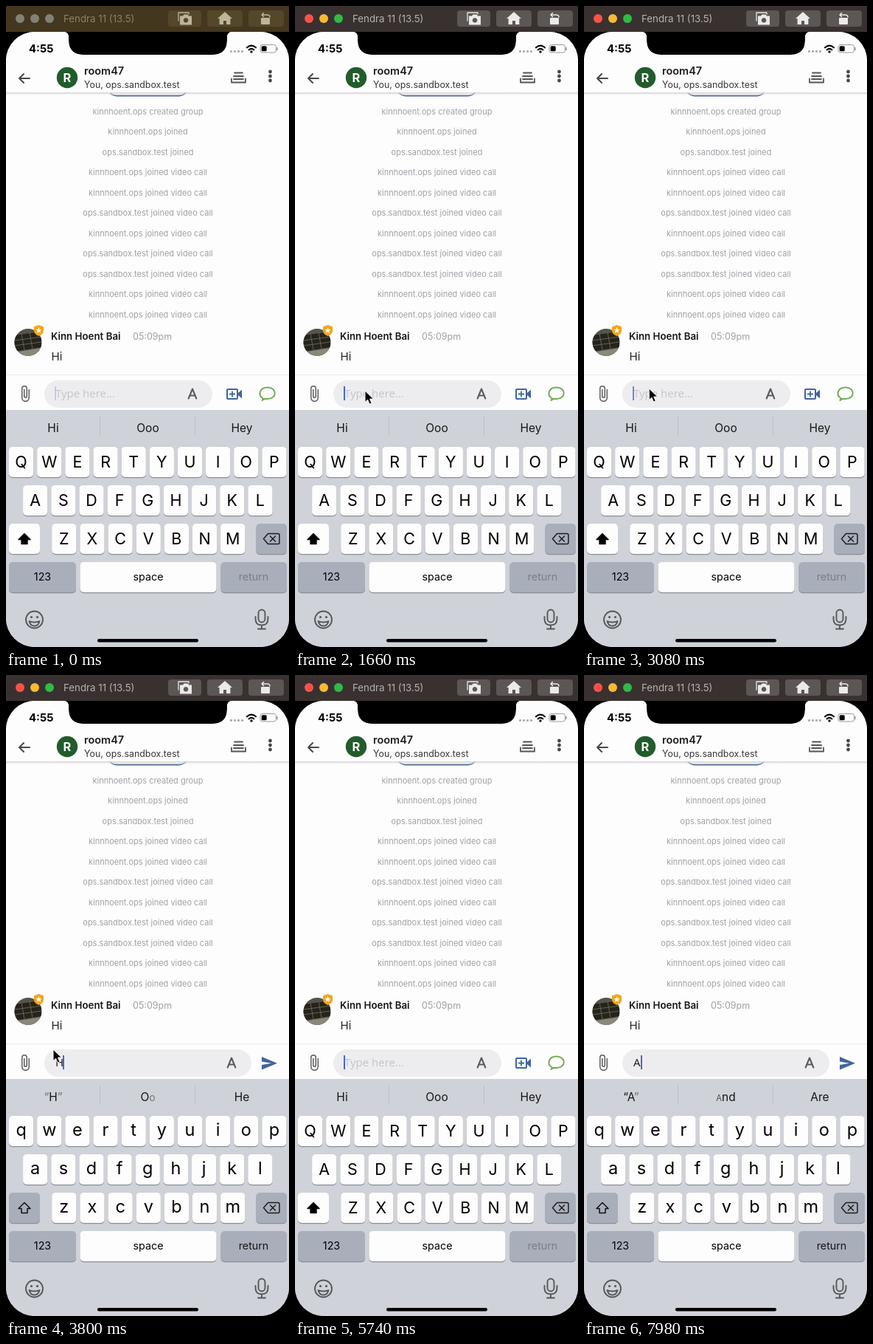
An HTML page for the animation above (8000 ms loop, 384 by 868 pixels).

```html
<!DOCTYPE html>
<html lang="en">
<head>
<meta charset="utf-8">
<title>Chat</title>
<style>
html, body { margin: 0; width: 100%; height: 100%; overflow: hidden; background: #000; }
svg { display: block; width: 100%; height: 100%; }
text { font-family: Inter, Roboto, sans-serif; white-space: pre; }
.open { font-family: "Open Sans", "Noto Sans", sans-serif; }
.mid { text-anchor: middle; }
.line { fill: none; stroke-linecap: round; stroke-linejoin: round; }
</style>
</head>
<body>
<svg id="stage" viewBox="0 0 384 868">
  <defs>
    <clipPath id="screen">
      <path d="M0 74A39 39 0 0 1 39 35H78Q85 35 85 43V46Q85 66 105 66H280Q300 66 300 46V43Q300 35 307 35H345A39 39 0 0 1 384 74V829A39 39 0 0 1 345 868H39A39 39 0 0 1 0 829Z"/>
    </clipPath>
    <clipPath id="face"><circle cx="30" cy="455.500" r="18.500"/></clipPath>
    <linearGradient id="shade" x2="0" y2="1">
      <stop stop-color="#cfcfd2"/><stop offset="1" stop-color="#fdfdfd" stop-opacity="0"/>
    </linearGradient>
  </defs>
  <rect width="384" height="868"/>

  <rect id="bar" width="384" height="35"/>
  <g id="lights"></g>
  <text id="device" x="78" y="22" font-size="13.3">Fendra 11 (13.5)</text>
  <g id="tools">
    <rect x="220" y="6" width="45" height="22" rx="4"/>
    <rect x="273" y="6" width="48" height="22" rx="4"/>
    <rect x="329" y="6" width="48" height="22" rx="4"/>
  </g>
  <g id="toolIcons">
    <path class="line" stroke="currentColor" stroke-width="1.300" d="M234 20V9H248V11"/>
    <path fill="currentColor" fill-rule="evenodd" d="M236 13.500h4l1.500-2h5l1.500 2h4v12h-16zM244 16a3.300 3.300 0 1 0 .1 0z"/>
    <path fill="currentColor" d="M297 8l10 9h-2.600v8H299v-5h-4v5h-5.400v-8H287z"/>
    <rect x="346" y="16" width="12" height="9" rx="1" fill="currentColor"/>
    <path class="line" stroke="currentColor" stroke-width="1.500" d="M347 12h7q4 0 4 3M349.500 9.500L347 12l2.500 2.500"/>
  </g>

  <g clip-path="url(#screen)">
    <rect y="35" width="384" height="833" fill="#fdfdfd"/>
    <rect x="138" y="90" width="109" height="31.500" rx="12" fill="none" stroke="#4c6590" stroke-width="1.800"/>
    <rect y="35" width="384" height="82" fill="#fdfdfd"/>
    <rect y="117" width="384" height="5" fill="url(#shade)"/>

    <text x="31" y="63" font-size="14.800" font-weight="650">4:55</text>
    <path d="M304 61.500H322" stroke="#a9a9ac" stroke-width="2.500" stroke-dasharray="3 2"/>
    <g class="line" stroke="#000" stroke-width="2.200">
      <path d="M327 56.300Q333 51 339 56.300M329.700 59.300Q333 56.300 336.300 59.300"/>
    </g>
    <circle cx="333" cy="62" r="1.700"/>
    <rect x="345" y="52.500" width="21.500" height="10.500" rx="3" fill="none" stroke="#98989b"/>
    <rect x="346.700" y="54.200" width="7" height="7.100" rx="1.500"/>
    <path d="M368 56v4" stroke="#98989b" stroke-width="1.500"/>

    <path class="line" d="M32 98H18M24 92l-6 6 6 6" stroke="#48484c" stroke-width="2"/>
    <circle cx="83" cy="97" r="14.200" fill="#235c2c"/>
    <text class="mid" x="83" y="103" font-size="16.500" font-weight="700" fill="#fdfdfd">R</text>
    <text x="106" y="93" font-size="14.500" font-weight="600" fill="#1c1c1e">room47</text>
    <text x="106" y="110.500" font-size="12.400" fill="#38383c">You, ops.sandbox.test</text>
    <path class="line" d="M310 90.500H321M309 95H322M306 98.500V103.500H325V98.500M309 99H322" stroke="#555559" stroke-width="1.800"/>
    <g fill="#48484c"><circle cx="358.500" cy="89" r="2.400"/><circle cx="358.500" cy="95" r="2.400"/><circle cx="358.500" cy="101" r="2.400"/></g>

    <g id="log" class="mid" font-size="11" fill="#a0a0a8"></g>

    <path id="callout" d="M42 464H91Q99 464 99 472V489Q99 497 91 497H75L67 505L59 497H42Q34 497 34 489V472Q34 464 42 464Z" fill="#cfcfd1"/>
    <g clip-path="url(#face)">
      <rect x="11" y="436" width="38" height="39" fill="#55534a"/>
      <path d="M11 446L48 441V462L11 468Z" fill="#25231d"/>
      <path d="M11 453L48 448M11 460L48 455M21 444L25 466M32 442L36 464" stroke="#76725f" stroke-width=".8"/>
      <path d="M11 469L48 463V475H11Z" fill="#8a877b"/>
    </g>
    <path d="M44.500 432l6.500 2.300v5.200q0 5-6.500 7.500q-6.500-2.500-6.500-7.500v-5.200z" fill="#f3a61c"/>
    <path d="M44.500 435l1.100 2.700 2.900.2-2.200 1.900.7 2.900-2.500-1.600-2.500 1.600.7-2.900-2.200-1.900 2.900-.2z" fill="#fdfdfd"/>
    <text x="61" y="452" font-size="13.300" font-weight="600" fill="#161618">Kinn Hoent Bai</text>
    <text x="172" y="452" font-size="12.500" fill="#a0a0a8">05:09pm</text>
    <text x="61.500" y="480" font-size="15" fill="#252528">Hi</text>

    <path d="M0 499.500H384" stroke="#ececef"/>
    <path transform="translate(14 513)" fill="#5c5c60" d="M16.500 6v11.500a4 4 0 0 1-8 0V5a2.500 2.500 0 0 1 5 0v10.500a1 1 0 0 1-2 0V6H10v9.500a2.500 2.500 0 0 0 5 0V5a4 4 0 0 0-8 0v12.500a5.500 5.500 0 0 0 11 0V6z"/>
    <rect id="pill" x="52" y="507" height="37" rx="18.500" fill="#ededf0"/>
    <text id="hint" class="open" x="67" y="530" font-size="15" fill="#c3c3ca">Type here...</text>
    <text id="typed" class="open" x="67" y="530" font-size="15" fill="#151517"></text>
    <rect id="caret" y="515" width="2" height="19" fill="#4a66d2"/>
    <path id="format" class="line" d="M-5.300 531.500L0 518.500L5.300 531.500M-3.500 527.500H3.500" stroke="#5a5a5f" stroke-width="2.100"/>
    <g id="idleIcons">
      <rect x="300" y="519" width="14" height="13" rx="1" fill="none" stroke="#41659c" stroke-width="2"/>
      <path d="M315 524l5-4.500v12l-5-4.500z" fill="#41659c"/>
      <path d="M303 525.500h8M307 521.500v8" stroke="#41659c" stroke-width="1.800"/>
      <path class="line" d="M349 531.500C341 527 344 516.500 355 516.500C368 516.500 368 532 355 532Q353 532 351.500 531.700L347.500 534Z" stroke="#74aa55" stroke-width="2"/>
    </g>
    <path id="send" d="M347 517L368 525.700L347 534.500V528L360 525.700L347 523.500Z" fill="#41659c"/>

    <rect y="547" width="384" height="321" fill="#cfd2d8"/>
    <path d="M127.500 556V581M256.500 556V581" stroke="#bcc0c8"/>
    <g id="words" class="mid" font-size="15.500" fill="#161618"></g>
    <g id="keys"></g>
    <path id="shiftIcon" class="line" d="M25 714.500L33 722.500H29V728.500H21V722.500H17Z" stroke="#111" stroke-width="1.500"/>
    <path class="line" d="M355.500 714.500H369Q371 714.500 371 716.500V726.500Q371 728.500 369 728.500H355.500L349.500 721.500ZM358.500 718l7 7M365.500 718l-7 7" stroke="#1c1c1e" stroke-width="1.500"/>
    <g class="line" stroke="#56585e" stroke-width="1.900">
      <circle cx="38.500" cy="831" r="11.500"/>
      <path d="M31.500 833Q38.500 836 45.500 833Q44 839.500 38.500 839.500T31.500 833Z"/>
      <rect x="342.500" y="817.500" width="9" height="17" rx="4.500"/>
      <path d="M338.500 827V830Q338.500 838.500 347 838.500T355.500 830V827M347 839V843M342 843.500H352"/>
    </g>
    <g fill="#56585e"><circle cx="34.500" cy="827.500" r="1.600"/><circle cx="42.500" cy="827.500" r="1.600"/></g>
    <rect x="124" y="857" width="137" height="4.500" rx="2.200"/>
  </g>
  <path id="pointer" d="M0 0V15.500L3.600 12.200L6.100 18L9 16.800L6.500 11.100H11.500Z" stroke="#fdfdfd" stroke-width="1"/>
</svg>
<script>
const LOOP = 8000, ACTIVE = 1640, TYPE_H = 3720, ERASE = 5040, TYPE_A = 7900;
const $ = id => document.getElementById(id);
const clamp = v => Math.max(0, Math.min(1, v));

function add(parent, tag, attrs, text) {
  const el = document.createElementNS("http://www.w3.org/2000/svg", tag);
  set(el, attrs);
  if (text !== undefined) el.textContent = text;
  return parent.appendChild(el);
}
function set(el, attrs) { for (const k in attrs) el.setAttribute(k, attrs[k]); }
const show = (el, on) => { el.style.display = on ? "" : "none"; };

const lights = [19, 39, 59].map(cx => add($("lights"), "circle", { cx, cy: 17, r: 6 }));

const A = "kinnhoent.ops", B = "ops.sandbox.test", CALL = " joined video call";
[A + " created group", A + " joined", B + " joined",
  ...[A, A, B, A, B, B, A, A].map(who => who + CALL)]
  .forEach((line, i) => add($("log"), "text", { x: 192.5, y: 147 + i * 27.45 }, line));

// Keyboard
const WHITE = "#fdfdfd", GREY = "#a9aebb";
function key(x, y, w, fill) {
  add($("keys"), "rect", { x, y: y + 1.3, width: w, height: 41, rx: 5, fill: "#8b8e96" });
  return add($("keys"), "rect", { x, y, width: w, height: 41, rx: 5, fill });
}
const letters = [];
[["QWERTYUIOP", 4], ["ASDFGHJKL", 23.1], ["ZXCVBNM", 62.2]].forEach(([row, x0], r) => {
  [...row].forEach((ch, i) => {
    const x = x0 + i * 38.15, y = 597 + r * 52;
    key(x, y, 33.2, WHITE);
    letters.push({ ch, y, el: add($("keys"), "text", { class: "mid", x: x + 16.6 }) });
  });
});
const shiftKey = key(4, 701, 42, WHITE);
key(339.5, 701, 41.5, GREY);
const label = (x, s) => add($("keys"), "text", { class: "mid", x, y: 778, "font-size": 14.3 }, s);
key(4, 753, 91, GREY); label(49.5, "123");
key(100.5, 753, 185, WHITE); label(193, "space");
key(291.5, 753, 89.5, GREY);
const returnLabel = label(336, "return");

const words = [64, 192.5, 320].map(x => add($("words"), "text", { x, y: 576.5 }));

// Each part is [text, opacity, size]
function suggest(i, ...parts) {
  words[i].textContent = "";
  for (const [s, o = 1, size = 15.5] of parts)
    add(words[i], "tspan", { "fill-opacity": o, "font-size": size }, s);
}

function updateWords(t) {
  if (t >= TYPE_A) {
    const p = clamp((t - TYPE_A) / 160);
    suggest(0, ["“A"], ["”", p]);
    suggest(1, ["A", 0.4 + p * 0.6, 7 + p * 8.5], ["nd"]);
    suggest(2, ["Are"]);
  } else if (t >= TYPE_H && t < ERASE + 100) {
    const p = clamp((t - TYPE_H) / 160);
    suggest(0, ["“", p], ["H"], ["”", p]);
    if (p < 1) suggest(1, ["O"], ["o", 1 - p, 15.5 - p * 3]);
    else suggest(1, ["Hi"]);
    suggest(2, ["He"]);
  } else ["Hi", "Ooo", "Hey"].forEach((w, i) => suggest(i, [w]));
}

function updateKeys(upper) {
  for (const { ch, y, el } of letters) {
    el.textContent = upper ? ch : ch.toLowerCase();
    set(el, { y: y + (upper ? 28.3 : 26.5), "font-size": upper ? 21.5 : 23.5 });
  }
  set(shiftKey, { fill: upper ? WHITE : GREY });
  $("shiftIcon").style.fill = upper ? "#000" : "none";
  set(returnLabel, { fill: upper ? "#7a7d86" : "#161618" });
}

const path = [[480, 60, 440], [680, 116, 473], [1200, 112, 500], [1600, 95, 521],
  [2900, 95, 521], [3500, 64, 507], [4250, 64, 507]];

function updatePointer(t) {
  const i = path.findIndex(k => k[0] > t);
  show($("pointer"), i > 0);
  if (i < 1) return;
  const [t0, x0, y0] = path[i - 1], [t1, x1, y1] = path[i];
  const u = (t - t0) / (t1 - t0), e = u * u * (3 - 2 * u);
  set($("pointer"), { transform: `translate(${x0 + (x1 - x0) * e} ${y0 + (y1 - y0) * e})` });
}

// The blink restarts in its lit phase after each edit
function caretAlpha(t, editedAt) {
  const p = (editedAt ? t - editedAt + 490 : t + 40) % 1000;
  return clamp(Math.min(p, 900 - p) / 160);
}

function draw(t) {
  const active = t >= ACTIVE;
  set($("bar"), { fill: active ? "#393130" : "#43371f" });
  set($("tools"), { fill: active ? "#5c5655" : "#54472a" });
  set($("device"), { fill: active ? "#b5b0b0" : "#8c8169" });
  $("toolIcons").style.color = active ? "#ebe9e9" : "#bdb59b";
  ["#f9524a", "#f6ba35", "#2fbb45"].forEach((c, i) => set(lights[i], { fill: active ? c : "#858077" }));

  const char = t >= TYPE_A ? "A" : t >= TYPE_H && t < ERASE ? "H" : "";
  const wide = t >= TYPE_A || (t >= TYPE_H && t < ERASE + 80);
  $("typed").textContent = char;
  show($("hint"), !char);
  show($("send"), wide);
  show($("idleIcons"), !wide);
  set($("pill"), { width: wide ? 281 : 228 });
  set($("format"), { transform: `translate(${wide ? 306 : 253} 0)` });

  const lastEdit = [TYPE_A, ERASE, TYPE_H].find(k => t >= k);
  set($("caret"), { x: char ? 77 : 66, opacity: caretAlpha(t, lastEdit) });
  set($("callout"), { opacity: clamp(Math.min((t - 2420) / 100, (2780 - t) / 200)) });

  updateKeys(!char);
  updateWords(t);
  updatePointer(t);
}

const start = performance.now();
function tick() {
  draw((performance.now() - start) % LOOP);
  requestAnimationFrame(tick);
}
tick();
</script>
</body>
</html>
```
